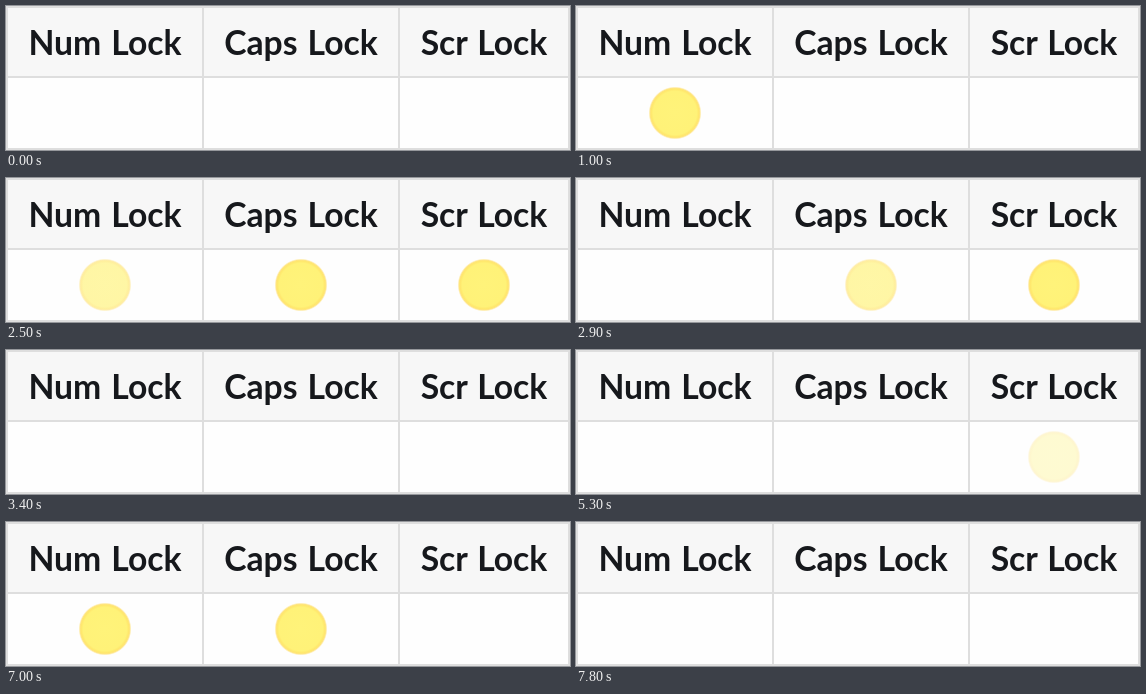
Write an HTML page that moves like this. It is 564x144 px and loops after 8800 ms.

```html
<!DOCTYPE html>
<html lang="en">
<head>
<meta charset="utf-8">
<title>Lock indicators</title>
<style>
  html, body { margin: 0; width: 100%; height: 100%; overflow: hidden; background: #fefefe; }
  svg { display: block; }
  text { font: 700 33.7px Lato, Carlito, sans-serif; word-spacing: 1.8px; text-anchor: middle; fill: #16181c; }
</style>
</head>
<body>
<svg width="564" height="144" viewBox="0 0 564 144">
  <defs>
    <radialGradient id="glow">
      <stop offset="0" stop-color="#fff37a"/>
      <stop offset=".82" stop-color="#fff278"/>
      <stop offset=".9" stop-color="#ffe76c"/>
      <stop offset=".94" stop-color="#ffe274" stop-opacity=".9"/>
      <stop offset="1" stop-color="#ffe694" stop-opacity="0"/>
    </radialGradient>
  </defs>
  <rect width="564" height="144" fill="#fefefe"/>
  <rect width="564" height="71" fill="#f7f7f7"/>
  <path d="M1 1H563V143H1ZM1 71H563M197 1V143M393 1V143" fill="none" stroke="#dedede" stroke-width="2"/>
  <g id="columns"></g>
</svg>
<script>
const LOOP = 8800, STEP = 50, STEPS = 3;

// Each lamp lights twice per loop: [on, off] start times in ms.
const lamps = [
  { label: 'Num Lock', x: 99, lit: [[900, 2500], [6100, 7700]] },
  { label: 'Caps Lock', x: 295, lit: [[1300, 2900], [5700, 7300]] },
  { label: 'Scr Lock', x: 478, lit: [[1700, 3300], [5300, 6900]] },
];

function add(name, attributes) {
  const node = document.createElementNS('http://www.w3.org/2000/svg', name);
  for (const key in attributes) node.setAttribute(key, attributes[key]);
  return document.getElementById('columns').appendChild(node);
}

for (const lamp of lamps) {
  add('text', { x: lamp.x, y: 49 }).textContent = lamp.label;
  lamp.node = add('circle', { cx: lamp.x, cy: 107, r: 26.5, fill: 'url(#glow)' });
}

// Stepped fade: the first step shows at the start time itself.
function fade(t, start) {
  const step = Math.floor((t - start) / STEP) + 1;
  return Math.max(0, Math.min(STEPS, step)) / STEPS;
}

function draw(t) {
  for (const { node, lit } of lamps) {
    const level = lit.reduce((sum, [on, off]) => sum + fade(t, on) - fade(t, off), 0);
    node.setAttribute('opacity', level);
  }
}

const start = performance.now();
function tick() {
  draw((performance.now() - start) % LOOP);
  requestAnimationFrame(tick);
}
tick();
</script>
</body>
</html>
```
